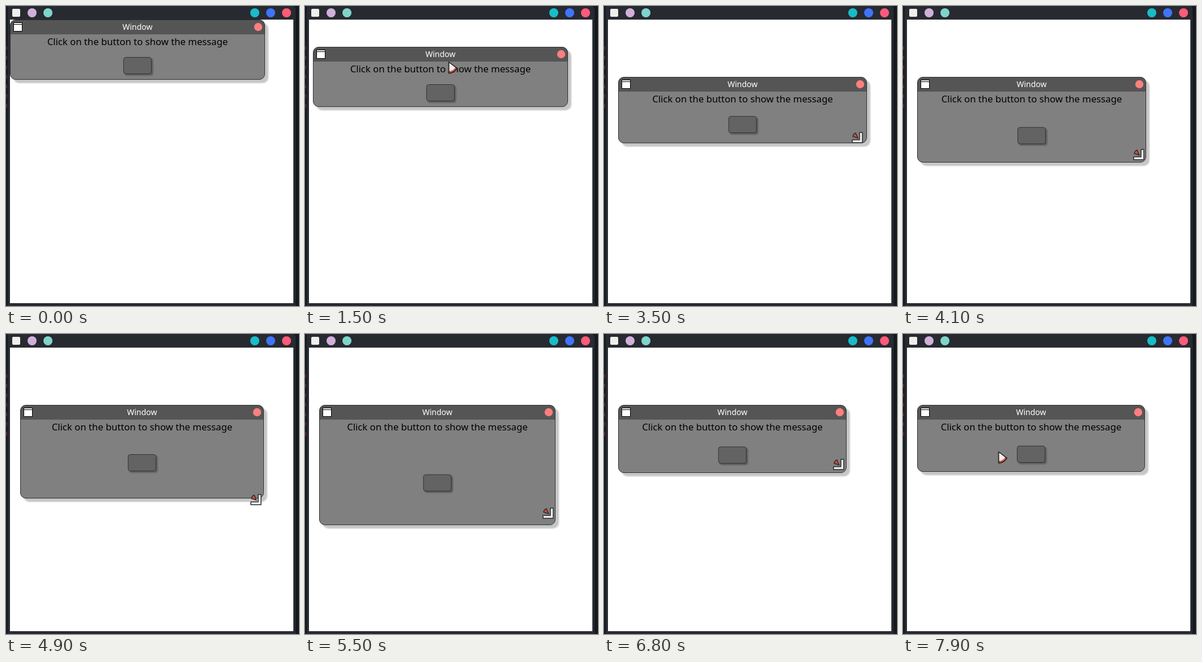
Write an HTML page that moves like this. It is 517 px wide and 529 px high and loops after 8 s.

```html
<!DOCTYPE html>
<html lang="en">
<head>
<meta charset="utf-8">
<title>Window</title>
<style>
  html, body { margin: 0; width: 100%; height: 100%; overflow: hidden; background: #272a30; }
  svg { display: block; width: 100%; height: 100%; }
  text { font-family: "Noto Sans", "Open Sans", sans-serif; text-anchor: middle; }
</style>
</head>
<body>
<svg viewBox="0 0 517 529">
  <defs>
    <filter id="soft" filterUnits="userSpaceOnUse" x="-60" y="-60" width="640" height="650">
      <feGaussianBlur stdDeviation="1.3"/>
    </filter>
  </defs>

  <rect width="517" height="529" fill="#141a1f"/>
  <path id="marks" fill="none" stroke="#8c2f49" stroke-width="1.2"/>
  <path d="M3 0H506Q511 1 511 6V529H3Z" fill="#272a30"/>
  <rect x="7" y="24" width="500" height="500" fill="#fff"/>
  <rect x="11" y="5" width="14" height="14" rx="2" fill="#eeeeec"/>
  <g id="dots"></g>

  <rect id="shadow" rx="10" fill="#000" opacity=".22" filter="url(#soft)"/>
  <rect id="body" rx="9.5" fill="#808080"/>
  <g id="bar">
    <path id="barFill" fill="#555"/>
    <rect x="6.5" y="5.5" width="15" height="15" fill="#fff" stroke="#000"/>
    <path d="M6 8.5H22" stroke="#000"/>
    <circle id="close" cy="13" r="7.2" fill="#ff7f7f"/>
    <text id="title" y="18" font-size="14" fill="#fff">Window</text>
    <text id="label" y="45" font-size="16.7">Click on the button to show the message</text>
  </g>
  <rect id="edge" rx="9.5" fill="none" stroke="#303030"/>
  <g id="button">
    <rect x="-22.5" y="2.5" width="50" height="30" rx="4" opacity=".3" filter="url(#soft)"/>
    <rect x="-24.5" y=".5" width="49" height="29" rx="4" fill="#636363" stroke="#333"/>
  </g>

  <g id="pointer" stroke="#2b2b2b" stroke-linejoin="round">
    <g id="arrow">
      <path d="M.8 1V20.5Q10 20.5 15.2 11.8Z" fill="#e4553f" stroke-width="2"/>
      <path d="M1.7 2.5V16.8Q8.2 16.500 12.2 10.5Z" fill="#eee" stroke="none"/>
    </g>
    <g id="down" stroke-width="1.5">
      <path d="M10 11L6 2Q10 .8 14 2Z" fill="#d64a3c"/>
      <rect x="1" y="14" width="18" height="5" fill="#eee"/>
    </g>
    <g id="corner" stroke-width="1.5">
      <path d="M11 11L7 2Q3 3.5 2 8Z" fill="#d64a3c"/>
      <path d="M14 1H19V19H1V14H14Z" fill="#eee"/>
    </g>
  </g>
</svg>
<script>
const LOOP = 8000, STEP = 100;
const LAG = 60;         // the window trails the pointer by this many ms
const MIN_WIDTH = 400;
const HOME = { x: 7, y: 24, w: 450, h: 105 };

// Pointer routes as [time, x, y]; the pointer rests between routes
const enter = [[500, 233, 0], [1000, 244, 38]];
const drag = [[1200, 244, 38], [1500, 253, 98], [1700, 262, 139]];
const cross = [[1800, 262, 139], [2100, 404, 242], [2250, 440, 262], [2400, 468, 245]];
const hover = [[2600, 457, 207]];
const resize = [
  [3300, 452, 207], [3900, 406, 252], [4100, 406, 252], [4600, 459, 256], [4780, 433, 249],
  [4900, 431, 282], [5150, 420, 346], [6140, 416, 233], [6200, 407, 227], [6900, 404, 219]
];
const leave = [[7000, 418, 233], [7500, 255, 183], [7800, 206, 207], [7900, 168, 207]];

const routes = [
  { from: 500, shape: "arrow", keys: enter },
  { from: 1200, shape: "arrow", keys: drag },
  { from: 1800, shape: "arrow", keys: cross },
  { from: 2600, shape: "down", keys: hover },
  { from: 3100, shape: "corner", keys: resize },
  { from: 7000, shape: "arrow", keys: leave }
];

const $ = id => document.getElementById(id);
const set = (id, attrs) => {
  for (const k in attrs) $(id).setAttribute(k, attrs[k]);
};
const move = (id, x, y) => set(id, { transform: `translate(${x} ${y})` });

// Position along a route, held at both ends
function along(keys, t) {
  const next = keys.findIndex(k => k[0] >= t);
  const b = next < 0 ? keys[keys.length - 1] : keys[next];
  if (next < 1) return [b[1], b[2]];
  const a = keys[next - 1], p = (t - a[0]) / (b[0] - a[0]);
  return [1, 2].map(n => Math.round(a[n] + (b[n] - a[n]) * p));
}

function shift(keys, t) {
  const [x, y] = along(keys, t);
  return [x - keys[0][1], y - keys[0][2]];
}

function sizeAt(t) {
  const [dx, dy] = shift(resize, t);
  return [Math.max(MIN_WIDTH, HOME.w + dx), HOME.h + dy];
}

function drawWindow(t) {
  const [dx, dy] = shift(drag, t - LAG), [w, h] = sizeAt(t - LAG);
  const x = HOME.x + dx, y = HOME.y + dy, mid = w / 2;
  const box = { x: x + .5, y: y + .5, width: w - 1, height: h };
  set("body", box);
  set("edge", box);
  set("shadow", { x: x + 6, y: y + 6, width: w, height: h + 1 });
  move("bar", x, y);
  set("barFill", { d: `M.5 26V10A9.5 9.5 0 0 1 10 .5H${w - 10}A9.5 9.5 0 0 1 ${w - .5} 10V26Z` });
  set("close", { cx: w - 12 });
  set("title", { x: mid });
  set("label", { x: mid });

  // The button is laid out one lag later than its window
  const spare = sizeAt(t - 2 * LAG)[1] - HOME.h;
  move("button", x + mid, y + 66 + spare / 2);
}

function drawPointer(t) {
  const route = routes.filter(r => r.from <= t).pop();
  if (route) move("pointer", ...along(route.keys, t));
  for (const id of ["arrow", "down", "corner"])
    set(id, { display: route && route.shape === id ? "inline" : "none" });
}

function draw(t) {
  drawWindow(t);
  drawPointer(t);
}

$("dots").innerHTML = [
  [46, "#d0b0da"], [74, "#7fd4cb"], [439, "#18bdc8"], [467, "#3f74fb"], [495, "#ff5a79"]
].map(([x, c]) => `<circle cx="${x}" cy="12" r="8" fill="${c}"/>`).join("");

set("marks", {
  d: Array.from({ length: 7 }, (_, i) => `M2 ${71 + i * 17}l-2 3l2 3`).join("")
});

const start = performance.now();
function tick() {
  const t = (performance.now() - start) % LOOP;
  draw(Math.floor(t / STEP) * STEP);
  requestAnimationFrame(tick);
}
draw(0);
requestAnimationFrame(tick);
</script>
</body>
</html>
```
